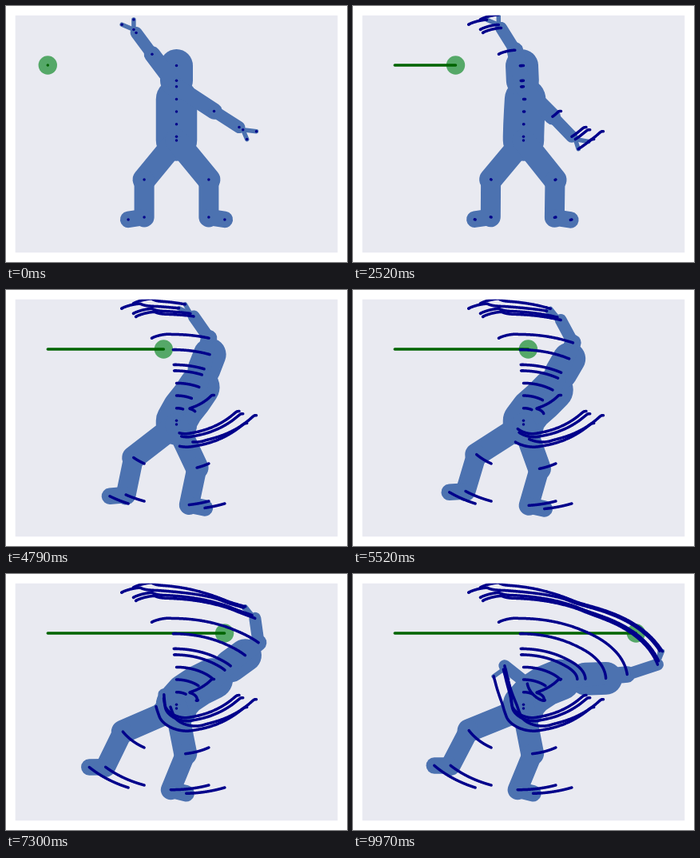
These frames come from a looping animation (427 by 320 pixels, 10000 ms). An HTML page with a canvas:

```html
<!DOCTYPE html>
<html lang="en">
<head>
<meta charset="utf-8">
<title>Reaching figure</title>
<style>
html, body { margin: 0; width: 100%; height: 100%; overflow: hidden; background: #fff; }
canvas { display: block; width: 427px; height: 320px; }
</style>
</head>
<body>
<canvas id="stage" width="427" height="320"></canvas>
<script>
const ctx = document.getElementById('stage').getContext('2d');
const FRAMES = 330, LOOP = 10, STEP = LOOP / FRAMES; // seconds
const SQUASH = 0.734; // the vertical axis is compressed
const HIP = [213.5, 168], ROOT = [213.5, 163.3], BALL = [52.3, 74];
const BODY = '#4c72b0', TRAIL = '#00008b';

function ease(t, from, to) {
  const u = Math.min(Math.max((t - from) / (to - from), 0), 1);
  return u * u * (3 - 2 * u);
}

// An angle over time: degrees clockwise from up, plus eased turns [amount, from, to].
const turn = (start, ...moves) => t =>
  moves.reduce((angle, [amount, from, to]) => angle + amount * ease(t, from, to), start);

// Phases shared by several joints, in seconds
const SWAY = [0, 2], LIFT = [0.5, 2.5], SWEEP = [1.2, 9.6];
const TOPPLE = [5.8, 10.4], GRASP = [6.5, 10.6];
const LEFT_STEP = [2.1, 8.2], RIGHT_STEP = [1.9, 7.5];

const spine = {
  low: turn(0, [33, 2, 6.5]),
  mid: turn(0, [48, 1.9, 6.8]),
  chest: turn(0, [61, 1.7, 8.5]),
  shoulder: turn(0, [-8, ...SWAY], [40, 2.5, 7.5], [57, ...TOPPLE]),
  head: turn(0, [-2, ...SWAY], [33, 2.3, 7], [58, ...TOPPLE])
};
const arms = [{
  upper: turn(-29, [20, ...LIFT], [37, 2.8, 7], [56, ...TOPPLE]),
  fore: turn(-28.5, [4, ...LIFT], [-9, 2.5, 3.8], [19, 3.4, 7], [86, ...GRASP]),
  fingerA: turn(-60, [15, 4.3, 6.5], [54, ...GRASP]),
  fingerB: turn(0, [-36, 2.3, 6.5], [56, ...GRASP])
}, {
  upper: turn(131.7, [45, 1.8, 3.9], [32, 3.2, 7.2], [58, ...GRASP]),
  fore: turn(131, [7, 2, 3.5], [179, ...SWEEP]),
  fingerA: turn(99.6, [62, ...SWEEP]),
  fingerB: turn(163, [63, ...SWEEP])
}];
const legs = [{
  thigh: turn(211.2, [30, ...LEFT_STEP]),
  shin: turn(180, [21, ...LEFT_STEP]),
  foot: turn(258.4, [11.6, ...LEFT_STEP])
}, {
  thigh: turn(148.8, [23, ...RIGHT_STEP]),
  shin: turn(180, [16.8, ...RIGHT_STEP]),
  foot: turn(101.6, [6.5, ...RIGHT_STEP])
}];

function reach([x, y], length, degrees) {
  const a = degrees * Math.PI / 180;
  return [x + length * Math.sin(a), y - SQUASH * length * Math.cos(a)];
}

function armPose(arm, shoulder, t) {
  const a = arm.fingerA(t), b = arm.fingerB(t);
  const elbow = reach(shoulder, 63, arm.upper(t));
  const wrist = reach(elbow, 41.7, arm.fore(t));
  const hand = reach(wrist, 6.3, (a + b) / 2);
  return [elbow, wrist, hand, reach(hand, 17, a), reach(hand, 17, b)];
}

function legPose(leg, t) {
  const knee = reach(HIP, 78, leg.thigh(t));
  const ankle = reach(knee, 64, leg.shin(t));
  return [knee, ankle, reach(ankle, 20.4, leg.foot(t))];
}

function pose(t) {
  const back = [HIP, ROOT];
  const grow = (length, part) => back.push(reach(back.at(-1), length, spine[part](t)));
  for (const part of ['low', 'mid', 'chest', 'shoulder']) grow(21.3, part);
  const shoulder = back.at(-1);
  grow(10.2, 'head');
  grow(25.6, 'head');
  return {
    back,
    shoulder,
    arms: arms.map(arm => armPose(arm, shoulder, t)),
    legs: legs.map(leg => legPose(leg, t))
  };
}

const joints = p => [...p.back, ...p.arms.flat(), ...p.legs.flat()];

function stroke(points, width, color) {
  ctx.lineWidth = width;
  ctx.strokeStyle = color;
  ctx.beginPath();
  ctx.moveTo(...points[0]);
  for (const q of points) ctx.lineTo(...q);
  ctx.stroke();
}

function drawBody({ back, shoulder, arms, legs }) {
  const limb = (width, ...points) => stroke(points, width, BODY);
  limb(51.5, ...back.slice(0, 5));
  limb(41, ...back.slice(6));
  for (const [elbow, wrist, hand, a, b] of arms) {
    limb(20.5, shoulder, elbow);
    limb(15, elbow, wrist);
    limb(5.5, wrist, hand, a);
    limb(5.5, hand, b);
  }
  for (const [knee, ankle, toe] of legs) {
    limb(29, HIP, knee);
    limb(25, knee, ankle);
    limb(20.5, ankle, toe);
  }
}

const poses = Array.from({ length: FRAMES }, (_, i) => pose(i * STEP));
const history = poses.map(joints);

function draw(frame) {
  const past = history.slice(0, frame + 1);
  const ball = [BALL[0] + 30.3 * frame * STEP, BALL[1]];

  ctx.fillStyle = '#fff';
  ctx.fillRect(0, 0, 427, 320);
  ctx.save();
  ctx.beginPath();
  ctx.rect(11.7, 11.7, 403.6, 296.6);
  ctx.clip();
  ctx.fillStyle = '#e9eaf1';
  ctx.fillRect(11, 11, 405, 298);
  ctx.lineCap = ctx.lineJoin = 'round';
  drawBody(poses[frame]);
  ctx.fillStyle = '#55a868';
  ctx.beginPath();
  ctx.arc(...ball, 11.7, 0, 2 * Math.PI);
  ctx.fill();
  stroke([BALL, ball], 3.5, '#006400');
  history[0].forEach((_, j) => stroke(past.map(q => q[j]), 3.5, TRAIL));
  ctx.restore();
}

let start = null;
function tick(now) {
  start ??= now;
  const t = Math.max(0, now - start) / 1000 % LOOP;
  draw(Math.floor(t / STEP + 0.15) % FRAMES);
  requestAnimationFrame(tick);
}
draw(0);
requestAnimationFrame(tick);
</script>
</body>
</html>
```
